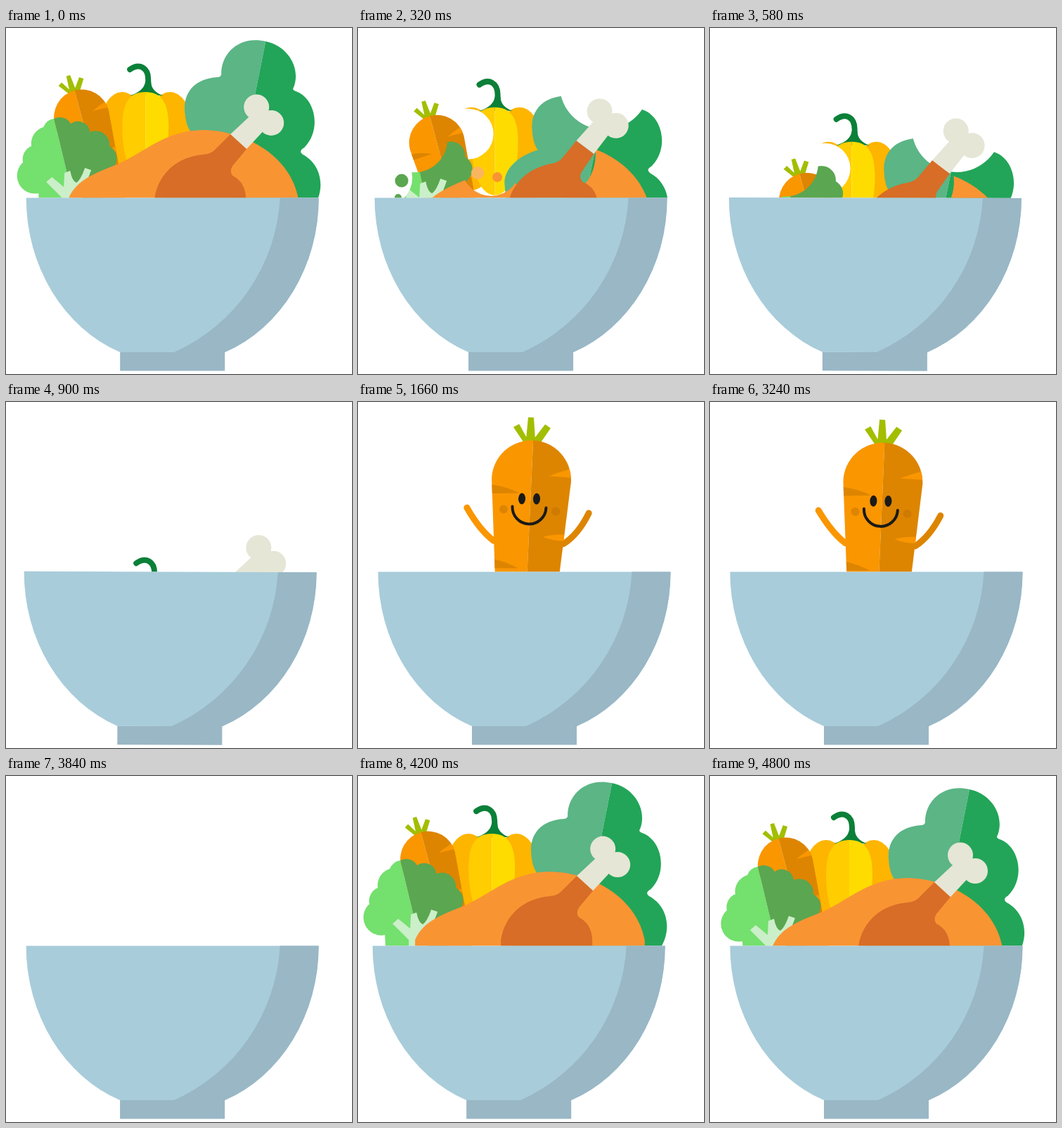
An HTML page for the animation above (4.82 s loop, 492 px wide and 492 px high).

```html
<!DOCTYPE html>
<html lang="en">
<head>
<meta charset="utf-8">
<title>Salad bowl</title>
<style>
  html, body { margin: 0; width: 100%; height: 100%; overflow: hidden; background: #fff; }
  svg { display: block; width: 100%; height: 100%; }
</style>
</head>
<body>
<svg viewBox="0 0 492 492">
  <defs>
    <clipPath id="aboveRim"><path d="M-60-60H560V241.5H-60Z"/></clipPath>
    <g id="carrotBody">
      <path fill="#a3be00" d="M-29-74L-21-79L-10-61L-8.6-89H-.6L2.5-61L16-80L24-75L11-54H-14Z"/>
      <path fill="#fa9600" d="M0-56.5A56.5 56.5 0 0 0-56.5 0L-38 230H0Z"/>
      <path fill="#dd8500" d="M0-56.5A56.5 56.5 0 0 1 56.5 0L38 230H0Z"/>
      <path fill="#dd8500" d="M-55.8 9Q-34 11-15.7 19.2L-54.8 21.5ZM-47.2 115Q-30 118-12.8 126.3L-46.3 127.5Z"/>
      <path fill="#fa9600" d="M53.6-18Q38-13 24.2-6.6L56.1-6ZM50.3 75.4Q36 75 20 79.8Q34 85 49.6 84.5Z"/>
    </g>
  </defs>
  <g id="scene">
    <g clip-path="url(#aboveRim)">
      <g id="pepper"><g>
        <rect x="135" y="91" width="60" height="118" rx="30" ry="45" fill="#fdb500"/>
        <rect x="203" y="91" width="60" height="118" rx="30" ry="45" fill="#fdb500"/>
        <path fill="#0b8038" d="M176 96Q196 90 198 76H206Q206 90 223 96Z"/>
        <path fill="none" stroke="#0b8038" stroke-width="8" stroke-linecap="round" d="M176 59C190 49 202 57 202 73V88"/>
        <path fill="#ffcd00" d="M198 91C176 91 165 105 165 140C165 190 180 216 198 216Z"/>
        <path fill="#ffdc00" d="M198 91C220 91 231 105 231 140C231 190 216 216 198 216Z"/>
      </g></g>
      <g id="lettuce"><g>
        <path fill="#5bb585" d="M369 19C330 10 305 38 306 66Q305 70 300 70C268 72 252 92 254 118Q255 137 262 147C240 153 212 172 215 197Q217 230 240 300H313Z"/>
        <path fill="#22a558" d="M369 19C402 26 419 58 409 84Q406 88 412 90C440 100 449 145 424 170Q415 175 422 180C445 192 455 222 440 250V300H313Z"/>
      </g></g>
      <g id="carrot"><g>
        <use href="#carrotBody" transform="translate(107.500 127)rotate(-15)scale(.7)"/>
      </g></g>
      <g id="broccoli"><g>
        <path fill="#74e06e" d="M68 129A18 18 0 0 0 53 141A24 24 0 0 0 36 168A20 20 0 0 0 24 191A25.500 25.500 0 0 0 46 235L50 300H109Z"/>
        <path fill="#5ba650" d="M68 129A18 18 0 0 1 92 136A17 17 0 0 1 119 148A20 20 0 0 1 147 168A20 20 0 0 1 155 195L140 215L130 300H109Z"/>
        <path fill="#cbefc9" d="M57 219L65 212L82 226L83 206L91 203Q94 218 100 220Q106 216 112 199L121 202Q112 225 108 242V300H80V242Z"/>
      </g></g>
      <g id="chicken"><g>
        <path fill="#f99433" d="M89 242C100 215 130 205 160 193C200 175 225 146 280 145C345 146 405 185 415.5 242V300H89Z"/>
      </g></g>
      <g id="drumstick"><g>
        <path fill="#d76d27" d="M211 242C217 205 245 183 280 180Q291 179 296 174L319 151L342 172L322 196Q317 204 322 210Q340 219 341 242V300H211Z"/>
        <path fill="#e5e6d6" d="M319 151L348 124L366 122L369 143L342 172Z"/>
        <circle cx="356" cy="112.500" r="18" fill="#e5e6d6"/>
        <circle cx="377" cy="135" r="18" fill="#e5e6d6"/>
      </g></g>
      <g id="crumbs"></g>
      <g id="hero">
        <g fill="none" stroke-width="9" stroke-linecap="round">
          <path id="armLeft" stroke="#fa9600"/>
          <path id="armRight" stroke="#dd8500"/>
        </g>
        <use href="#carrotBody"/>
        <circle cx="-37.600" cy="43.300" r="6" fill="#dd8500"/>
        <circle cx="36.500" cy="42.900" r="6" fill="#cf7a00"/>
        <g id="eyesOpen" fill="#1a1a1a">
          <ellipse cx="-12.300" cy="27" rx="5" ry="8"/>
          <ellipse cx="8.700" cy="26.300" rx="5" ry="8"/>
        </g>
        <g fill="none" stroke="#1a1a1a" stroke-width="4" stroke-linecap="round">
          <path d="M-25.300 38.600A24 24 0 0 0 22.700 38.600"/>
          <path id="eyesHappy" d="M-18.700 32A6.500 6.500 0 0 1-5.700 32M3.400 32A6.500 6.500 0 0 1 16.400 32"/>
        </g>
      </g>
    </g>
    <path fill="#a8ccda" d="M28.500 241.500H444.500A208 235 0 0 1 311 461H162A208 235 0 0 1 28.500 241.500Z"/>
    <path fill="#99b7c5" d="M389.500 241.500H444.500A208 235 0 0 1 311 461V487.500H162V461H239A255 255 0 0 0 389.500 241.500Z"/>
  </g>
</svg>
<script>
const LOOP = 4820, FOOD_IN = 3840;
const $ = id => document.getElementById(id);
const clamp = p => Math.min(1, Math.max(0, p));
const backOut = (p, s) => { const u = clamp(p) - 1; return 1 + (s + 1) * u ** 3 + s * u * u; };

function make(tag, parent, attrs) {
  const el = document.createElementNS('http://www.w3.org/2000/svg', tag);
  for (const key in attrs) el.setAttribute(key, attrs[key]);
  return parent.appendChild(el);
}

// drop and drift: travel by 900 ms; lean: largest tilt; bites: [x, y, radius, start]
const foods = {
  pepper: { drop: 170, drift: 12, lean: 0, bites: [[160, 129, 36, 120]] },
  lettuce: { drop: 208, drift: -12, lean: 0, bites: [[357, 54, 64, 60]] },
  carrot: { drop: 285, drift: 76, lean: 0, bites: [] },
  broccoli: { drop: 120, drift: 80, lean: 0, bites: [[75, 143, 47, 160], [32, 198, 40, 220]] },
  chicken: { drop: 130, drift: 20, lean: -2, bites: [[277, 164, 64, 200], [192, 177, 42, 240]] },
  drumstick: { drop: 94, drift: 6, lean: -6, bites: [] }
};
for (const name in foods) {
  const food = foods[name];
  food.el = $(name);
  const area = { x: -60, y: -60, width: 620, height: 620 };
  const mask = make('mask', food.el, { id: name + 'Mask', maskUnits: 'userSpaceOnUse', ...area });
  make('rect', mask, { ...area, fill: '#fff' });
  food.holes = food.bites.map(([cx, cy]) => make('circle', mask, { cx, cy, r: 0 }));
  if (food.bites.length) food.el.firstElementChild.setAttribute('mask', `url(#${name}Mask)`);
}

// [x, y, radius, sideways speed, colour], placed as they are at 320 ms
const crumbs = [
  [175, 206, 9, -.04, '#fab560'], [203, 212, 7, .04, '#f99433'],
  [67, 217, 9.5, -.04, '#5ba650'], [62, 241, 5, -.06, '#5ba650']
].map(([x, y, r, speed, fill]) => ({ x, y, speed, el: make('circle', $('crumbs'), { r, fill }) }));

// [start, end, amplitude, cycles]
const swings = [[0, 1180, 18, 2], [1180, 1640, 8, 1], [3840, 4300, 8, 1], [4300, 4600, 4.5, .5]];
function swingAt(t) {
  const swing = swings.find(([start, end]) => t >= start && t < end);
  if (!swing) return 0;
  const [start, end, amplitude, cycles] = swing;
  return amplitude * Math.sin(2 * Math.PI * cycles * (t - start) / (end - start));
}

function drawFoods(t) {
  const arriving = t >= FOOD_IN;
  const sink = (t / 900) ** 2;
  const rise = 230 * (1 - backOut((t - FOOD_IN) / 760, 1.4));
  const tip = Math.sin(Math.PI * clamp(t / 850));
  for (const name in foods) {
    const { el, drop, drift, lean, bites, holes } = foods[name];
    const x = arriving ? 0 : drift * sink, y = arriving ? rise : drop * sink;
    el.setAttribute('transform', `translate(${x} ${y}) rotate(${lean * tip} 290 194)`);
    holes.forEach((hole, i) => {
      const [, , r, start] = bites[i];
      hole.setAttribute('r', arriving ? 0 : r * clamp((t - start) / 80));
    });
  }
  for (const { x, y, speed, el } of crumbs) {
    const dt = t - 320;
    el.setAttribute('cx', x + speed * dt);
    el.setAttribute('cy', y + .12 * dt + .0008 * dt * dt);
    el.setAttribute('visibility', t > 220 && t < 600 ? 'visible' : 'hidden');
  }
}

// The carrot leaves along the path it came by.
function drawHero(time) {
  const t = 2440 - Math.abs(time - 2440);
  const p = clamp((t - 1400) / 600), sway = p * p * (3 - 2 * p);
  const y = 118.5 + 230 * (1 - backOut((t - 1340) / 600, 1.15));
  $('hero').setAttribute('transform',
    `translate(${241.5 + 12.5 * sway} ${y}) rotate(${1.53 + 2.67 * sway})`);
  $('hero').setAttribute('visibility', t > 1340 ? 'visible' : 'hidden');
  const lift = (sway - .4) / .6;
  const arm = (side, reach) => `M${side * reach} ${43.3 - 4 * lift}` +
    `Q${side * (70 + 4.5 * lift)} ${74.7 + 3 * lift} ${side * 49.6} 88.6`;
  $('armLeft').setAttribute('d', arm(-1, 89.8 - lift));
  $('armRight').setAttribute('d', arm(1, 83.7 - 2 * lift));
  const happy = t >= 1900;
  $('eyesOpen').setAttribute('display', happy ? 'none' : 'inline');
  $('eyesHappy').setAttribute('display', happy ? 'inline' : 'none');
}

function draw(now) {
  const t = now % LOOP;
  const tilt = t > 320 && t < 1480 ? .2 * Math.sin(Math.PI * (t - 320) / 1160) : 0;
  $('scene').setAttribute('transform', `translate(${swingAt(t)} 0) rotate(${tilt} 236.5 300)`);
  drawFoods(t);
  drawHero(t);
}

const begin = performance.now();
function tick() {
  draw(performance.now() - begin);
  requestAnimationFrame(tick);
}
tick();
</script>
</body>
</html>
```
